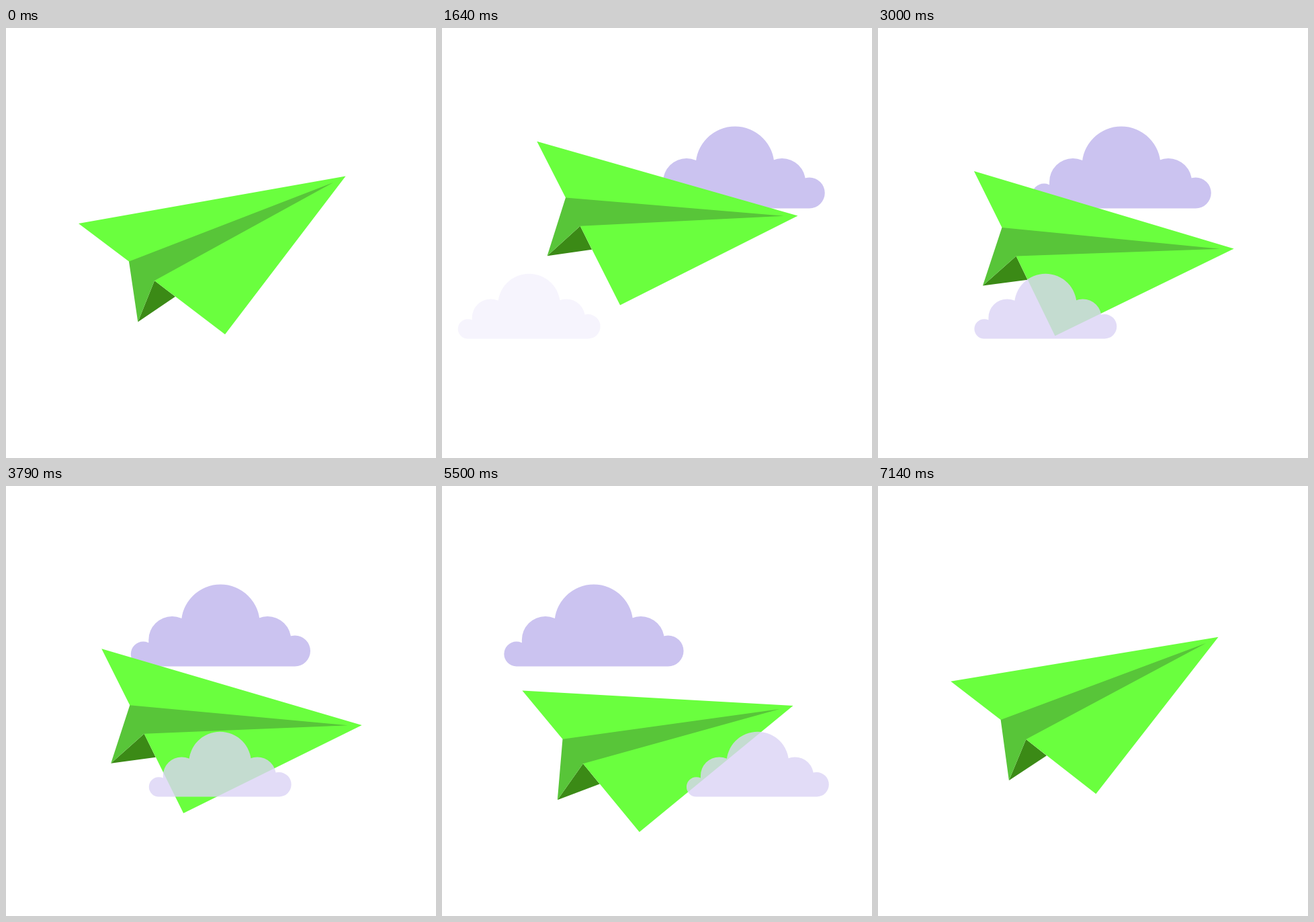
Write an HTML page with a canvas that moves like this. It is 640x640 px and loops after 7.21 s.

```html
<!DOCTYPE html>
<html lang="en">
<head>
<meta charset="utf-8">
<title>Paper plane</title>
<style>
  html, body { margin: 0; width: 100%; height: 100%; overflow: hidden; background: #fff; }
  canvas { display: block; width: 100vmin; height: 100vmin; }
</style>
</head>
<body>
<canvas id="stage" width="640" height="640"></canvas>
<script>
const ctx = document.getElementById('stage').getContext('2d');
const LOOP = 7210;
const STEP = 1000 / 14;
const PIVOT = { x: 336, y: 314.5 };
const MAX_TILT = 26.7 * Math.PI / 180;
const BOB = [0, -31.1, 0.1, 44.1, 77.2, 48.4]; // heights evenly spaced over the loop

const polygon = points => new Path2D('M' + points.join('L') + 'Z');

// Plane corners in its first pose
const tail = [108, 291], nose = [505.5, 220.5], wing = [326, 456], crease = [487, 230];
const foldLeft = [183, 347.5], foldRight = [221, 376], keel = [196.3, 437.5], under = [252, 399.8];
const plane = [
  ['#3b8a16', polygon([keel, foldRight, under])],
  ['#6aff3e', polygon([tail, nose, wing, foldRight, foldLeft])],
  ['#58c539', polygon([foldLeft, crease, foldRight, keel])]
];

// Cloud outline with its origin at the middle of the flat base
const cloud = new Path2D();
function puff(x, y, r) {
  cloud.moveTo(x + r, y);
  cloud.arc(x, y, r, 0, Math.PI * 2);
}
puff(0, -63.5, 58.5);
puff(-72, -39.5, 35);
puff(70, -39.5, 35);
puff(-115, -18.5, 18.5);
puff(110.7, -23, 23);
cloud.rect(-107, -39.5, 212, 39.5);
cloud.rect(-115, -18.5, 225.7, 18.5);

const clamp = v => Math.max(0, Math.min(1, v));

// Tips down quickly, holds, then slowly noses up again
const tilt = t => MAX_TILT * clamp(Math.min(t / 1690, (LOOP + 18 - t) / 3480));

// Smooth closed curve through the bob heights
function lift(t) {
  const n = BOB.length, p = t / LOOP * n, i = Math.floor(p), u = p - i;
  const [a, b, c, d] = [-1, 0, 1, 2].map(k => BOB[(i + k + n) % n]);
  return b + u / 2 * (c - a + u * (2 * a - 5 * b + 4 * c - d + u * (3 * (b - c) + d - a)));
}

// Opacity that rises after `from` and falls before `to`
const fade = (t, from, to) => clamp(Math.min(t - from, to - t) / 220);

function drawCloud(x, base, scale, color, alpha) {
  ctx.save();
  ctx.globalAlpha = alpha;
  ctx.fillStyle = color;
  ctx.translate(x, base);
  ctx.scale(scale, scale);
  ctx.fill(cloud);
  ctx.restore();
}

function drawPlane(t) {
  ctx.save();
  ctx.translate(PIVOT.x, PIVOT.y + lift(t));
  ctx.rotate(tilt(t));
  ctx.translate(-PIVOT.x, -PIVOT.y);
  for (const [color, shape] of plane) {
    ctx.fillStyle = color;
    ctx.fill(shape);
  }
  ctx.restore();
}

function draw(now) {
  const t = Math.floor((now % LOOP + 5) / STEP) * STEP;
  ctx.fillStyle = '#fff';
  ctx.fillRect(0, 0, 640, 640);
  drawCloud(525.6 - 0.0545 * t, 268.5, 1, '#cbc3f0', fade(t, 430, 7070));
  drawPlane(t);
  drawCloud(-15.3 + 0.0882 * t, 462.5, 0.793, '#dbd4f5', 0.8 * fade(t, 1572, 6140));
}

const start = performance.now();
function tick() {
  draw(performance.now() - start);
  requestAnimationFrame(tick);
}
tick();
</script>
</body>
</html>
```
